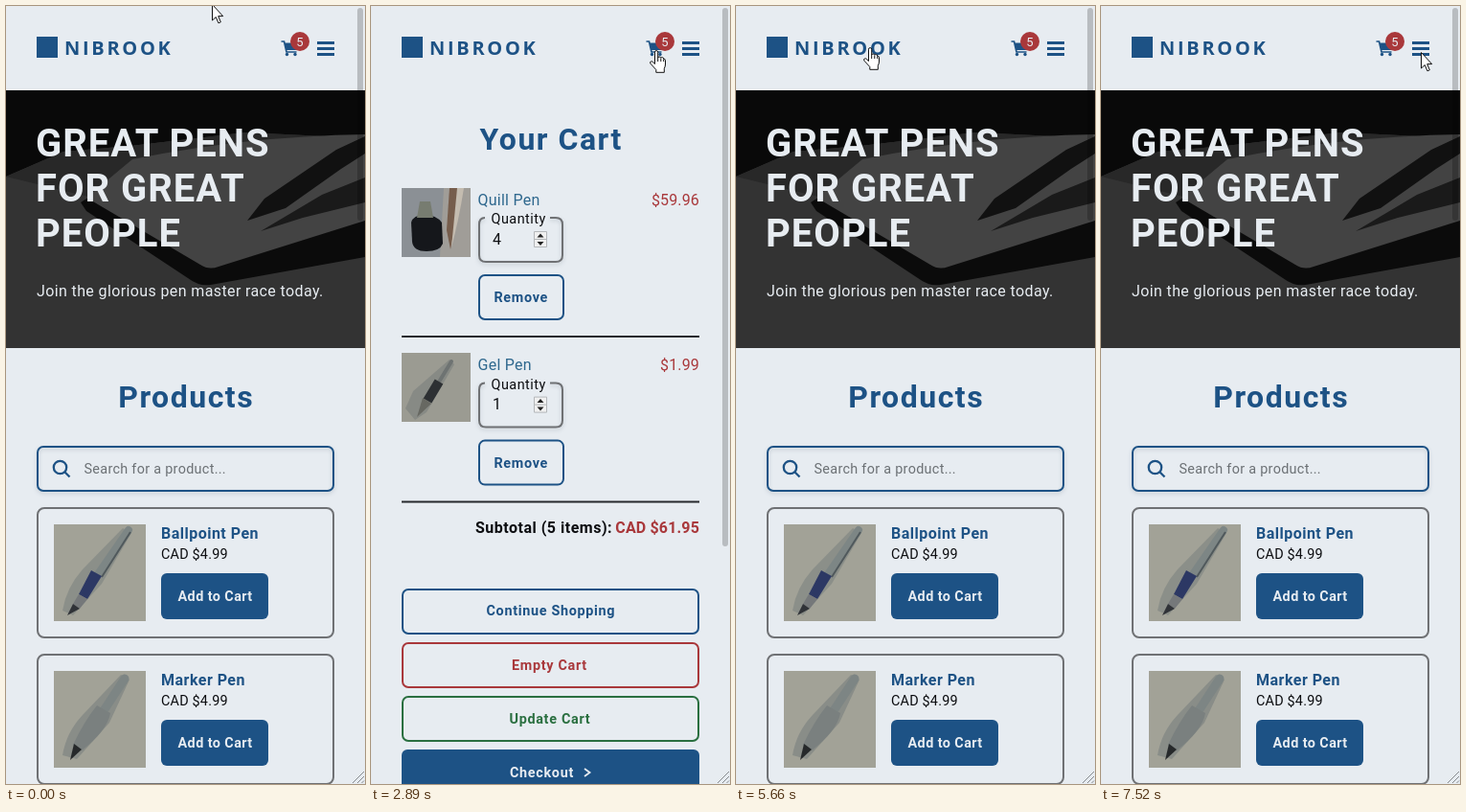
Write an HTML page that moves like this. It is 375 px wide and 812 px high and loops after 8000 ms.

```html
<!DOCTYPE html>
<html lang="en">
<head>
<meta charset="utf-8">
<title>Pen shop</title>
<style>
:root { --bg: #e7ecf1; --blue: #1d5285; --red: #a9383b; --green: #2a6f40; --grey: #6f7174; }
html, body { margin: 0; width: 100%; height: 100%; overflow: hidden; background: var(--bg); }
svg { display: block; }
.stage { position: absolute; left: 0; top: 0; width: 375px; height: 812px; }
text { font: 16px Roboto, Inter, sans-serif; letter-spacing: .25px; fill: #0c0d10; white-space: pre; }
.brand { font: 700 20px "Open Sans", "Noto Sans", sans-serif; letter-spacing: 2.7px; fill: var(--blue); }
.hero text { fill: var(--bg); letter-spacing: .38px; }
.hero .big { font-size: 40px; font-weight: 600; letter-spacing: 1px; }
.title { font-size: 32px; font-weight: 600; letter-spacing: 1.5px; fill: var(--blue); text-anchor: middle; }
.name { font-weight: 600; letter-spacing: .48px; fill: var(--blue); }
.small { font-size: 14.4px; letter-spacing: .2px; }
.hint { font-size: 14.4px; letter-spacing: .3px; fill: #6c7175; }
.btn { font-size: 14.4px; font-weight: 600; letter-spacing: .68px; fill: var(--blue); }
.btn.tight { letter-spacing: .42px; }
.on { fill: var(--bg); }
.item { fill: #2f688e; }
.legend { font-size: 14.4px; letter-spacing: .5px; }
.total { font-weight: 600; letter-spacing: .5px; }
.price { fill: var(--red); letter-spacing: .15px; text-anchor: end; }
.box { fill: none; stroke-width: 2; }
.soft { filter: drop-shadow(0 2px 2px rgba(40, 60, 80, .2)); }

.home, .cart, .hand, .arrow { animation: 8s step-end infinite; }
.home { animation-name: home; }
.cart { animation-name: cart; }
.hand { animation-name: hand; }
.arrow { animation-name: arrow; }
@keyframes home { 0%, 70.75% { opacity: 1 } 36.125% { opacity: 0 } }
@keyframes cart { 0%, 70.75% { opacity: 0 } 36.125% { opacity: 1 } }
@keyframes hand {
  0%, 54.875%, 81.34%, 88.625% { opacity: 0 }
  3.875%, 57.125%, 86.375% { opacity: 1 }
}
@keyframes arrow {
  0%, 54.875%, 81.34%, 88.625% { opacity: 1 }
  3.875%, 57.125%, 86.375% { opacity: 0 }
}

/* the pointer is sampled about every 60 ms */
.pointer { animation: travel 8s linear infinite; }
@keyframes travel {
  0% { transform: translate(215px, -2px) }
  .75% { transform: translate(215px, -2px); animation-timing-function: steps(4, jump-both) }
  3.875% { transform: translate(285px, 30px) }
  11.25% { transform: translate(285px, 30px); animation-timing-function: steps(4, jump-both) }
  14.25% { transform: translate(297px, 46px) }
  54.875% { transform: translate(297px, 46px); animation-timing-function: steps(4, jump-both) }
  57.875% { transform: translate(139px, 43px) }
  80.625% { transform: translate(139px, 43px); animation-timing-function: steps(6, jump-both) }
  84.875% { transform: translate(263px, 46px) }
  85.625% { transform: translate(263px, 46px); animation-timing-function: steps(3, jump-both) }
  87.875% { transform: translate(307px, 49px) }
  88.625% { transform: translate(307px, 49px); animation-timing-function: steps(1, jump-both) }
  89.375% { transform: translate(329px, 48px) }
  92.5% { transform: translate(329px, 48px); animation-timing-function: steps(2, jump-both) }
  94%, 100% { transform: translate(334px, 48px) }
}
</style>
</head>
<body>
<svg class="stage" viewBox="0 0 375 812" xmlns="http://www.w3.org/2000/svg">
<defs>
  <clipPath id="heroClip"><path d="M0 88H375V357H0Z"/></clipPath>
  <clipPath id="photoClip"><path d="M0 0H96V101H0Z"/></clipPath>
  <clipPath id="thumbClip"><path d="M0 0H72V72H0Z"/></clipPath>
  <g id="card">
    <rect class="box" x="33" y="524" width="309" height="135" rx="7" stroke="#6f7174"/>
    <rect x="162" y="592" width="112" height="48" rx="6" fill="#1d5285"/>
    <text class="btn on tight" x="179.500" y="621">Add to Cart</text>
    <text class="small" x="162" y="577">CAD $4.99</text>
  </g>
  <g id="row">
    <path class="box soft" d="M119 221Q113 221 113 228V260Q113 267 120 267H193Q200 267 200 260V228Q200 221 193 221H187" stroke="#6f7174"/>
    <text class="legend" x="125.500" y="227">Quantity</text>
    <path d="M170.500 235.500h13v16h-13zM170.500 243.500h13" fill="#f0f0f0" stroke="#b4b7ba"/>
    <path d="M173.500 241.500 177 237.500 180.500 241.500ZM173.500 246 177 250 180.500 246Z" fill="#222"/>
    <rect class="box" x="113" y="281" width="88" height="46" rx="6" stroke="#1d5285"/>
    <text class="btn" x="128.500" y="309">Remove</text>
    <path d="M32 345H343" stroke="#26292d" stroke-width="2"/>
  </g>
</defs>

<rect width="375" height="812" fill="#e7ecf1"/>

<g class="home">
  <g class="hero" clip-path="url(#heroClip)">
    <path d="M0 88H375V357H0Z" fill="#333"/>
    <path d="M0 88H375V138L250 132 130 146 60 152 0 178Z" fill="#090909"/>
    <path d="M0 178 60 152 130 146 250 132 375 138V170L90 200Z" fill="#282828"/>
    <path d="M78 205 92 196 215 270 375 218V262L214 291Q202 293 190 284L84 214Z" fill="#0b0b0b"/>
    <path d="M84 200 132 160Q250 136 375 134V224L222 272Q212 276 203 270Z" fill="#434343"/>
    <path d="M252 224 270 201 345 150 375 136V154L350 170 292 211Z" fill="#111"/>
    <path d="M266 235 330 197 375 179V205L310 221Z" fill="#1a1a1a"/>
    <text class="big" x="31" y="157">GREAT PENS</text>
    <text class="big" x="31" y="204">FOR GREAT</text>
    <text class="big" x="31" y="251">PEOPLE</text>
    <text x="32" y="303">Join the glorious pen master race today.</text>
  </g>
  <text class="title" x="188.200" y="419">Products</text>
  <rect class="box soft" x="33" y="460" width="309" height="46" rx="6" stroke="#1d5285"/>
  <g fill="none" stroke="#1d5285" stroke-width="2.300">
    <circle cx="56.500" cy="481.500" r="6.700"/><path d="M61.500 486.500 66.500 491.500"/>
  </g>
  <text class="hint" x="81.500" y="488">Search for a product...</text>

  <use href="#card"/>
  <text class="name" x="162" y="556">Ballpoint Pen</text>
  <g transform="translate(50 541)" clip-path="url(#photoClip)">
    <path d="M0 0H96V101H0Z" fill="#a2a297"/>
    <path d="M9 90Q13 66 30 47L72 4 81 9 50 62 20 95Z" fill="#8b8f89"/>
    <path d="M78 6 46 52" stroke="#7d8685" stroke-width="8" stroke-linecap="round"/>
    <path d="M80 8 50 55" stroke="#50595c" stroke-width="2"/>
    <path d="M39 48 50 54 35 78 26 73Z" fill="#2c3864"/>
    <path d="M26 73 35 78 27 88 20 83Z" fill="#75787a"/>
    <path d="M20 83 27 88 14 95Z" fill="#303338"/>
  </g>

  <g transform="translate(0 153)"><use href="#card"/></g>
  <text class="name" x="162" y="709">Marker Pen</text>
  <g transform="translate(50 694)" clip-path="url(#photoClip)">
    <path d="M0 0H96V101H0Z" fill="#a2a297"/>
    <path d="M9 88Q13 64 30 46L70 4 79 9 58 54 24 92Z" fill="#898d88"/>
    <path d="M74 8 53 40" stroke="#7d8584" stroke-width="9" stroke-linecap="round"/>
    <path d="M45 36 59 44Q56 62 29 83L20 77Q32 52 45 36Z" fill="#7a807f"/>
    <path d="M21 76 29 82 17 93Z" fill="#26292b"/>
  </g>
  <rect x="367" y="2" width="6" height="222" rx="3" fill="#000" opacity=".2"/>
</g>

<g class="cart">
  <text class="title" x="188.200" y="150">Your Cart</text>
  <use href="#row"/>
  <text class="item" x="111.500" y="208">Quill Pen</text>
  <text class="price" x="343" y="208">$59.96</text>
  <text x="127" y="249">4</text>
  <g transform="translate(32 190)" clip-path="url(#thumbClip)">
    <path d="M0 0H72V72H0Z" fill="#8b9095"/>
    <path d="M44 0H72V72H40Z" fill="#a09d98"/>
    <path d="M10 36Q12 28 24 28T42 36L43 58Q40 66 26 66T11 56Z" fill="#15171b"/>
    <path d="M19 14H30L33 31H16Z" fill="#777c70"/>
    <path d="M50 0H60Q58 30 51 64L47 44Z" fill="#765d4c"/>
    <path d="M58 0H65Q60 32 52 62Z" fill="#c4bcb0"/>
  </g>

  <g transform="translate(0 172.600)"><use href="#row"/></g>
  <text class="item" x="111.500" y="380">Gel Pen</text>
  <text class="price" x="343" y="380">$1.99</text>
  <text x="127" y="421">1</text>
  <g transform="translate(32 362)" clip-path="url(#thumbClip)">
    <path d="M0 0H72V72H0Z" fill="#9b9b92"/>
    <path d="M4 58 12 40 50 7 55 12 26 62 14 70Z" fill="#878a85"/>
    <path d="M52 9 38 32" stroke="#6e7372" stroke-width="4" stroke-linecap="round"/>
    <path d="M39 30 27 50" stroke="#2d3033" stroke-width="10"/>
    <path d="M22 47 31 53 16 67Z" fill="#676862"/>
  </g>

  <text class="total" x="109" y="550">Subtotal (5 items):</text>
  <text class="total price" x="343" y="550">CAD $61.95</text>
  <g class="box">
    <rect x="33" y="609" width="309" height="46" rx="6" stroke="#1d5285"/>
    <rect x="33" y="665" width="309" height="46" rx="6" stroke="#a9383b"/>
    <rect x="33" y="721" width="309" height="46" rx="6" stroke="#2a6f40"/>
  </g>
  <rect x="32" y="776" width="311" height="48" rx="6" fill="#1d5285"/>
  <text class="btn" x="120.500" y="636">Continue Shopping</text>
  <text class="btn" x="147" y="693" style="fill:var(--red)">Empty Cart</text>
  <text class="btn" x="144.500" y="749" style="fill:var(--green)">Update Cart</text>
  <text class="btn on" x="145" y="805">Checkout</text>
  <path d="M223 796 228.500 800 223 804" fill="none" stroke="#e7ecf1" stroke-width="1.800"/>
  <rect x="367" y="2" width="6" height="562" rx="3" fill="#000" opacity=".2"/>
</g>

<g fill="#1d5285">
  <rect x="32" y="32" width="22" height="22"/>
  <text class="brand" x="61" y="51">NIBROOK</text>
  <path d="M287.500 37H290.500L293 48H303.500" fill="none" stroke="#1d5285" stroke-width="1.700"/>
  <path d="M291 38.500H305L303.300 46H292.700Z"/>
  <circle cx="293.500" cy="50.500" r="1.700"/><circle cx="302" cy="50.500" r="1.700"/>
  <path d="M325 37h18v3h-18zM325 43h18v3h-18zM325 49h18v3h-18z"/>
</g>
<circle cx="307" cy="37" r="10" fill="#a9383b"/>
<text x="307" y="41.500" text-anchor="middle" style="font-size:13px;letter-spacing:0;fill:var(--bg)">5</text>
<path d="M362 811 374 799M367 811 374 804M371.500 811 374 808.500" stroke="#85898d"/>

<g class="pointer" fill="#fff" stroke="#111" stroke-linejoin="round">
  <path class="arrow" d="M.5 .5V17L4.300 13.500 6.900 19.800 9.300 18.800 6.700 12.600H11.700Z"/>
  <g class="hand" transform="translate(-6 0)">
    <path d="M5.500 14.500V2.200a1.600 1.600 0 0 1 3.200 0V8q0-1 1.400-1 1.600 0 1.700 1.200 .2-.7 1.400-.6 1.500 .1 1.500 1.500 1.800 0 1.800 1.600V15q0 2-1.200 4.300V23.300H6.800V20.500L1 14.200q-.9-1.400 .2-2.200 1.400-.7 2.600 .6Z"/>
    <path d="M8.700 8V12M11.800 8.500V12M14.700 9.300V12" fill="none"/>
  </g>
</g>
</svg>
</body>
</html>
```
